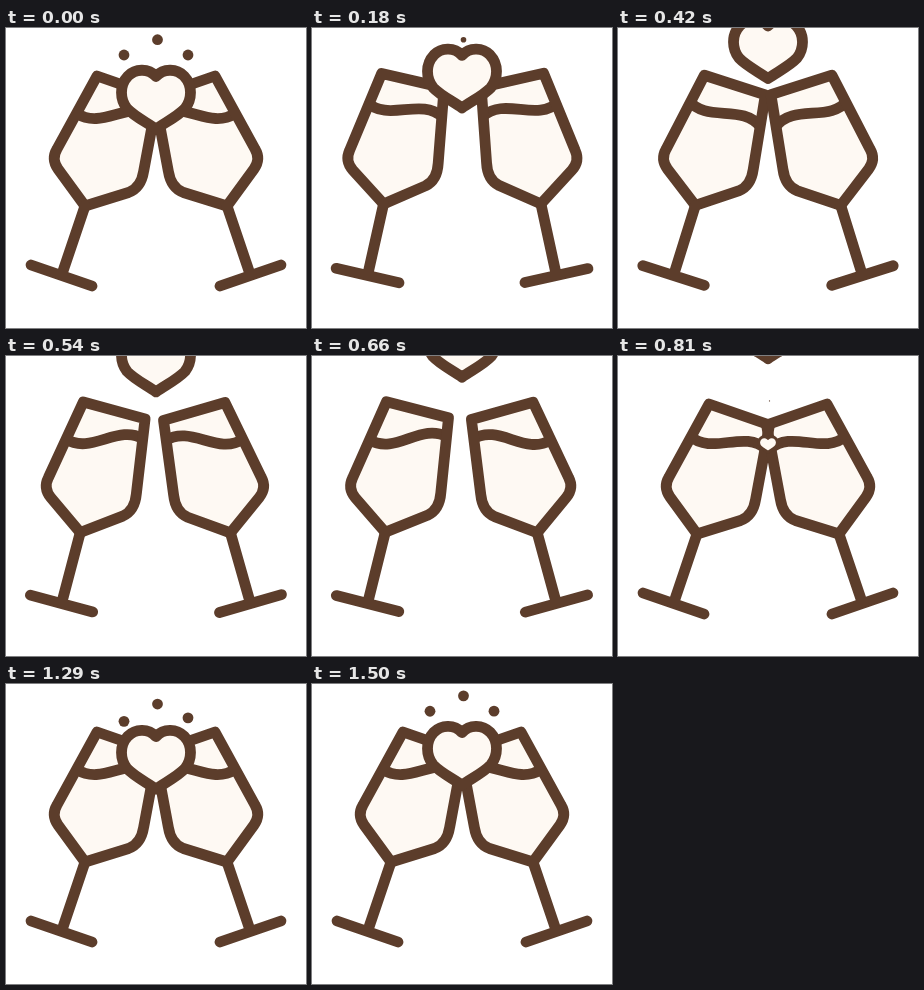
An HTML page with a canvas for the animation above (1.53 s loop, 300 px wide and 300 px high).

```html
<!DOCTYPE html>
<html lang="en">
<head>
<meta charset="utf-8">
<title>Toast</title>
<style>
  html, body { margin: 0; width: 100%; height: 100%; overflow: hidden; background: #fff; }
  canvas { display: block; width: 300px; height: 300px; }
</style>
</head>
<body>
<canvas id="stage" width="300" height="300"></canvas>
<script>
const ctx = document.getElementById('stage').getContext('2d');
const LOOP = 1530, STEP = 30;
const BROWN = '#5c3d2b', CREAM = '#fef9f3';
const PIVOT = { x: 56, y: 247 };

const bowl = new Path2D('M91 48L151.500 69L137.700 143Q135 160 122.500 164.500L79 178L52 141Q45 131 51 121Z');
const stand = new Path2D('M79 178L56 246M25 237L86 258');
const liquid = new Path2D('M-52 -3L-39 0C-13 16 13 -16 39 0L52 3');
const heart = new Path2D('M0 -22C-8 -31 -21 -29.500 -28 -22.500C-37 -13 -36 1 -29 10' +
  'C-21 18.500 -8 24.500 0 30.500C8 24.500 21 18.500 29 10C36 1 37 -13 28 -22.500C21 -29.500 8 -31 0 -22Z');

// Swing sizes in degrees for the two times each glass moves away
const glasses = [
  { mirrored: false, swings: [6.4, 5.2] },
  { mirrored: true, swings: [6.8, 3.8] },
];

// Liquid slope in degrees, relative to the clinking pose
const slosh = [[0, 1.5], [180, 17.5], [420, 22], [540, 4], [630, 0], [720, 10], [810, 10], [960, 1.5]];

const dots = [
  { x: 118, from: 48, to: 27, born: 1045, fade: 0, gone: 170 },
  { x: 151.5, from: 45, to: 11.7, born: 795, fade: 60, gone: 310 },
  { x: 182, from: 48, to: 27, born: 900, fade: 0, gone: 170 },
];

const progress = (t, a, b) => Math.min(1, Math.max(0, (t - a) / (b - a)));
const smooth = u => u * u * (3 - 2 * u);
const mix = (a, b, u) => a + (b - a) * u;
const radians = deg => deg * Math.PI / 180;

function keyed(keys, t) {
  let value = keys[0][1];
  for (let i = 1; i < keys.length; i++) {
    value = mix(value, keys[i][1], smooth(progress(t, keys[i - 1][0], keys[i][0])));
  }
  return value;
}

// Each swing ends in a clink
function opening([first, second], t) {
  return first * Math.sin(Math.PI * progress(t, 0, 450)) +
    second * Math.sin(Math.PI * progress(t, 450, 780));
}

function inGlass(glass, t, draw) {
  ctx.save();
  if (glass.mirrored) {
    ctx.translate(300, 0);
    ctx.scale(-1, 1);
  }
  ctx.translate(PIVOT.x, PIVOT.y);
  ctx.rotate(-radians(opening(glass.swings, t)));
  ctx.translate(-PIVOT.x, -PIVOT.y);
  draw();
  ctx.restore();
}

function drawGlasses(t) {
  const tilt = radians(keyed(slosh, t));
  glasses.forEach(glass => inGlass(glass, t, () => ctx.fill(bowl)));
  glasses.forEach(glass => inGlass(glass, t, () => {
    ctx.save();
    ctx.clip(bowl);
    ctx.translate(110, 86.5);
    ctx.rotate(tilt);
    ctx.stroke(liquid);
    ctx.restore();
    ctx.stroke(bowl);
    ctx.stroke(stand);
  }));
}

function drawDot(dot, t) {
  const leaving = t < 400;
  const y = leaving ? dot.to : mix(dot.from, dot.to, smooth(progress(t, dot.born, LOOP)));
  const size = leaving ? 1 - progress(t, dot.fade, dot.gone) : progress(t, dot.born, dot.born + 130);
  if (size <= 0) return;
  ctx.beginPath();
  ctx.arc(dot.x, y, 5.4 * size, 0, 2 * Math.PI);
  ctx.fillStyle = BROWN;
  ctx.fill();
}

function drawHeart(y, size) {
  ctx.save();
  ctx.translate(150, y);
  ctx.scale(size, size);
  ctx.fillStyle = CREAM;
  ctx.fill(heart);
  ctx.stroke(heart);
  ctx.restore();
}

function drawHearts(t) {
  if (t < 900) drawHeart(70.5 - 0.1225 * Math.max(0, t - 8), 1);
  if (t > 770) {
    const u = progress(t, 770, 1050);
    drawHeart(mix(88.5, 70.5, smooth(progress(t, 750, LOOP))), 1 - (1 - u) ** 2);
  }
}

function render(t) {
  ctx.fillStyle = '#fff';
  ctx.fillRect(0, 0, 300, 300);
  ctx.fillStyle = CREAM;
  ctx.strokeStyle = BROWN;
  ctx.lineWidth = 10.8;
  ctx.lineCap = ctx.lineJoin = 'round';
  drawGlasses(t);
  dots.forEach(dot => drawDot(dot, t));
  drawHearts(t);
}

const start = performance.now();
function tick() {
  const t = (performance.now() - start) % LOOP;
  render(Math.floor(t / STEP) * STEP);
  requestAnimationFrame(tick);
}
tick();
</script>
</body>
</html>
```
